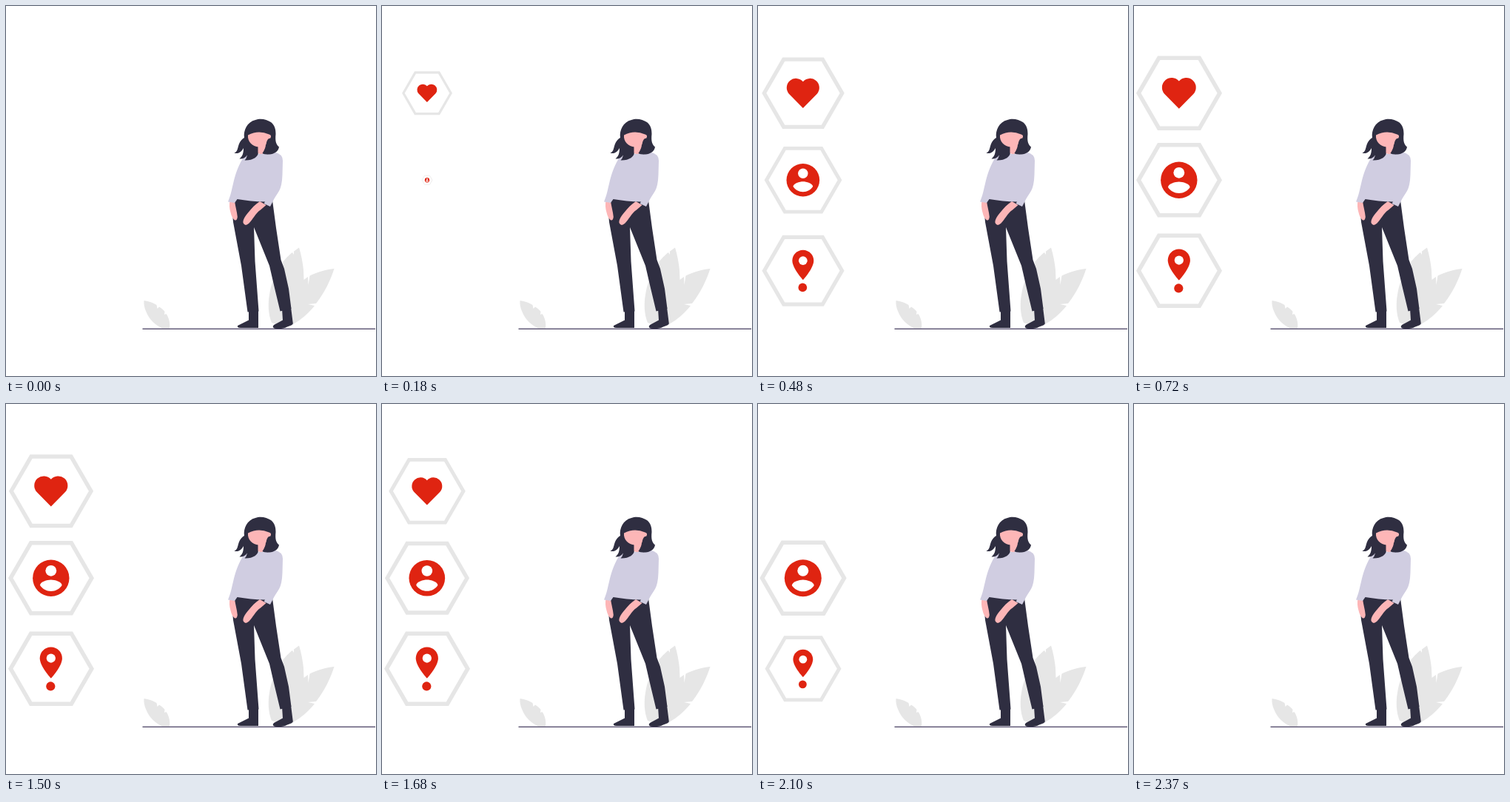
Write an HTML page that moves like this. It is 500 px wide and 500 px high and loops after 2430 ms.

```html
<!DOCTYPE html>
<html lang="en">
<head>
<meta charset="utf-8">
<title>Profile badges</title>
<style>
  html, body { margin: 0; width: 100%; height: 100%; overflow: hidden; background: #fff; }
  svg { display: block; width: 100%; height: 100%; }
  .hex { fill: none; stroke: #e6e6e6; stroke-width: 5.5; }
  .red { fill: #df2411; }
  .white { fill: #fff; }
  .dark { fill: #2f2e41; }
  .skin { fill: #fdb6b7; }
  .shirt { fill: #d0cde1; }
  .leaf { fill: #e6e6e6; }
</style>
</head>
<body>
<svg viewBox="0 0 500 500">
  <defs>
    <path id="hex" class="hex" d="M-54.8 0L-27.4 -47.45H27.4L54.8 0L27.4 47.45H-27.4Z"/>
  </defs>

  <!-- plants and floor -->
  <g class="leaf">
    <path d="M359 428C354 416 354 401 356 390C358 375 365 360 372 349L374.500 350L374 346C380 339 384 335 387 333L389 336L389 331.500L396 326.500C399 336 401 347 402 357L402.500 370L408 366L408.500 377L410.500 364.500C420 360 432 356 443.500 355C439 369 431 387 419 402L408 403L417 405C409 415 399 424 388 430L374 433Z"/>
    <path d="M186.500 398C193 399 199 401 203.500 404L204.500 409L207 406.500C211 409 213 411 214.500 413L214 417L216.500 416C220 421 222 428 221 435.500H211C202 431 194 424 190 414.500C187 408 186 403 186.500 398Z"/>
  </g>
  <path d="M184.500 436.300H499" stroke="#4a4263" stroke-width="1.200"/>

  <!-- woman -->
  <g class="dark">
    <path d="M328 410L341 411L341 435H317Q312 435 313 432L328 424.500Z"/>
    <path d="M373 409L385 407L387.800 429Q388 431 380 433.500Q374 437 363 435.800Q359 434 362 431L374 424.500Z"/>
    <path d="M312 259L360 262.500L365 300L371.500 343L376 355L382 382L385.500 409L370.500 412.500L362 377L356 351L335 299L336.500 345L341.500 412.500L326.500 413.500L318 351L307 292L305 268Z"/>
  </g>
  <g class="skin">
    <path d="M302.500 263L309 264C310 271 312 277 312.800 285Q312 291 308.500 289Q305 286 303.500 279Q301 271 302.500 263Z"/>
    <path d="M343 264L351.500 269L344 275.500C337 280 334 288 328.500 293.500Q323 298.500 320.500 293C320 289 323 284 327 279.500C332 273 337 268 343 264Z"/>
  </g>
  <path class="shirt" d="M322 203L341 200L352 199L363 197.500Q374 200 374 209L373.500 228Q373 243 369 250Q362 260 357 271L348.500 267L350 264.500C337 264.300 324 263 312.500 261L309 266L300 264.500C304 255 305 248 307 240C310 226 315 213 322 203Z"/>
  <path class="dark" d="M322 178C320.500 168 326 156.500 337 154C344 151 353 153.500 358 157C363 161 364.500 166 364.500 173C363.500 183 365 187 369 190.500C368 197 362 200 356 200.500Q350 201 346 199L341 196C342 204 333 209 322.500 208.500Q325 206 326 201.500C323 205.500 320 207 315.500 206.500C320 203 321 198 321 192C318 197.500 314 200 308.500 198.800C316 195.500 311 185 322 178Z"/>
  <path class="skin" d="M340.500 184H351.500L350.500 191L347 199.500Q343 201 340.500 198.500Z"/>
  <path class="dark" d="M351.500 184C352 192 348.500 196 346.500 199Q356 202 363 197L358 180Z"/>
  <path class="skin" d="M327 174.500Q341 167 355.500 173.500Q358.500 174 358 177Q357.500 179.500 355.500 179C353 180 352 184 351.500 187Q347 190.500 341.500 190.500C333 190 326 183 327 174.500Z"/>

  <!-- badges -->
  <g class="badge">
    <use href="#hex"/>
    <path class="red" d="M-.2 21L-19.900 1A13 13 0 0 1 -.2 -16.200A13 13 0 0 1 19.500 1Z"/>
  </g>
  <g class="badge">
    <use href="#hex"/>
    <circle class="red" cx="-.2" r="24.700"/>
    <circle class="white" cx="-.2" cy="-9.900" r="7.400"/>
    <path class="white" d="M-.2 17.800C-6.400 17.800 -11.800 14.600 -15 9.800C-14.900 4.900 -5.100 2.200 -.2 2.200C4.700 2.200 14.500 4.900 14.600 9.800C11.400 14.600 6 17.800 -.2 17.800Z"/>
  </g>
  <g class="badge">
    <use href="#hex"/>
    <path class="red" d="M-.2 -29.300C-8.600 -29.300 -15.300 -22.600 -15.300 -14.300C-15.300 -3.200 -.2 13 -.2 13S14.900 -3.200 14.900 -14.300C14.900 -22.600 8.200 -29.300 -.2 -29.300Z"/>
    <circle class="white" cx="-.2" cy="-14.200" r="6.100"/>
    <circle class="red" cx="-.7" cy="23.700" r="6.100"/>
  </g>
</svg>
<script>
  const LOOP = 2430, STEP = 30, SPAN = 540;
  const ENTER = { start: 0, gap: 90 };
  const LEAVE = { start: 1470, gap: 180 };
  const rows = [117.75, 235.25, 357.75];
  const badges = document.querySelectorAll('.badge');

  // Each key: [time 0..1, scale, power of the ease towards it]
  const popIn = [[0, 0], [0.444, 1.1, 2.2], [0.625, 0.87, 1], [1, 1, 1]];
  const popOut = [[0, 1], [0.475, 0.87, 1], [0.79, 1.1, 1], [1, 0, 1.6]];

  function sample(keys, p) {
    if (p <= 0) return keys[0][1];
    if (p >= 1) return keys[keys.length - 1][1];
    const i = keys.findIndex(k => k[0] >= p);
    const [t0, v0] = keys[i - 1];
    const [t1, v1, power] = keys[i];
    return v0 + (v1 - v0) * Math.pow((p - t0) / (t1 - t0), power);
  }

  function scaleAt(t, i) {
    const phase = t < LEAVE.start ? ENTER : LEAVE;
    const keys = phase === ENTER ? popIn : popOut;
    return sample(keys, (t - phase.start - i * phase.gap) / SPAN);
  }

  function draw(now) {
    const t = Math.floor((now % LOOP) / STEP) * STEP;
    badges.forEach((badge, i) => {
      const s = scaleAt(t, i);
      badge.setAttribute('visibility', s > 0 ? 'visible' : 'hidden');
      badge.setAttribute('transform', `translate(61 ${rows[i]}) scale(${s})`);
    });
  }

  const begin = performance.now();
  function tick() {
    draw(performance.now() - begin);
    requestAnimationFrame(tick);
  }
  tick();
</script>
</body>
</html>
```
